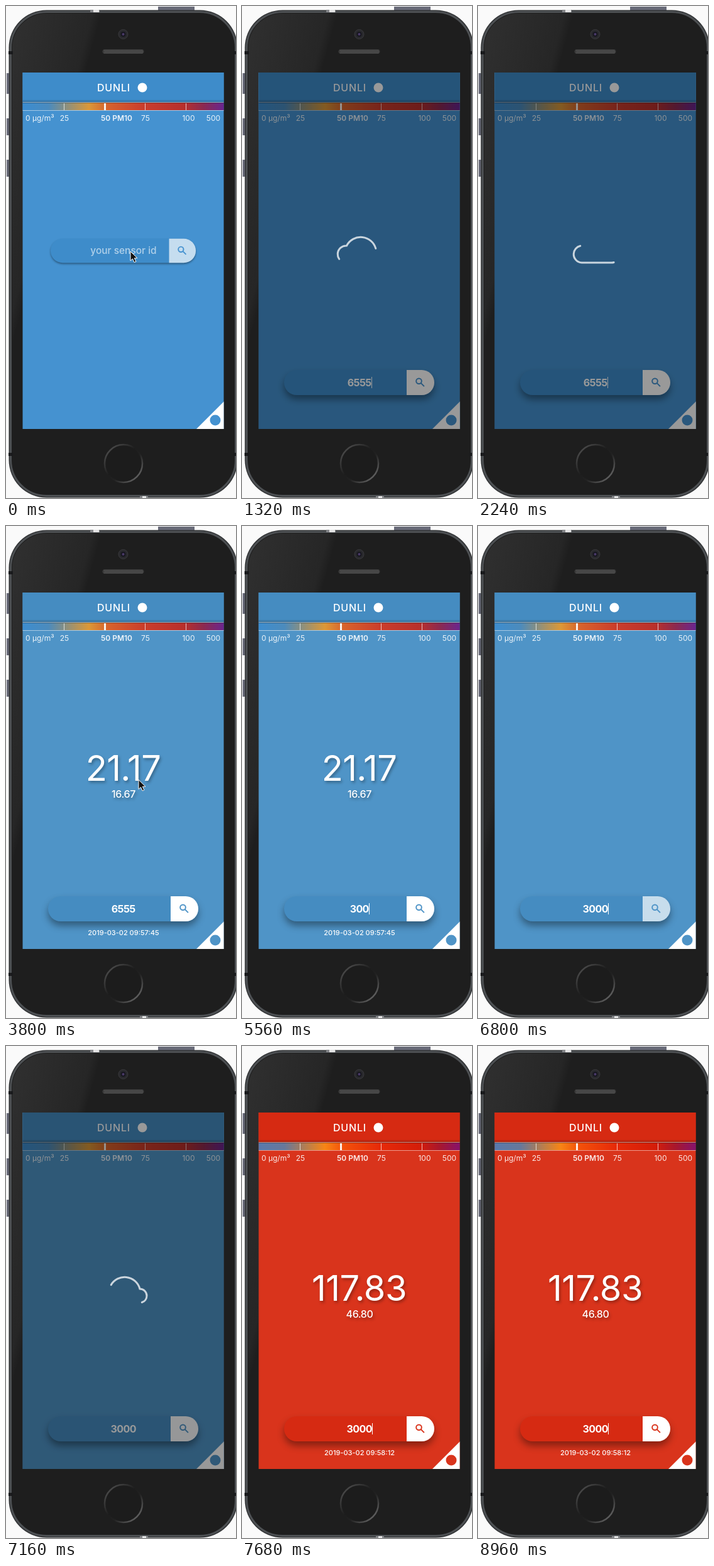
An HTML page for the animation above (9 s loop, 366 px wide and 784 px high).

```html
<!DOCTYPE html>
<html lang="en">
<head>
<meta charset="utf-8">
<title>Air sensor app</title>
<style>
  html, body { margin: 0; width: 100%; height: 100%; overflow: hidden; background: #fafafa; }
  svg { display: block; }
  text { font-family: Inter, Roboto, sans-serif; fill: #fff; }
  .mid { text-anchor: middle; }
  .labels text { font-size: 12px; fill-opacity: .9; }
  .shade { filter: drop-shadow(2px 3px 2px rgba(0, 0, 0, .3)); }
</style>
</head>
<body>
<svg width="366" height="784" viewBox="0 0 366 784">
  <defs>
    <linearGradient id="scale">
      <stop offset="0" stop-color="#388bd1"/>
      <stop offset=".13" stop-color="#4b89ba"/>
      <stop offset=".22" stop-color="#9f8f69"/>
      <stop offset=".33" stop-color="#ff9913"/>
      <stop offset=".42" stop-color="#fa5805"/>
      <stop offset=".6" stop-color="#ea2804"/>
      <stop offset=".8" stop-color="#d31704"/>
      <stop offset=".9" stop-color="#9b0f32"/>
      <stop offset="1" stop-color="#720a82"/>
    </linearGradient>
    <linearGradient id="face" x2=".6" y2=".35">
      <stop offset="0" stop-color="#303030"/>
      <stop offset=".45" stop-color="#262626"/>
      <stop offset=".5" stop-color="#1e1e1e"/>
    </linearGradient>
    <linearGradient id="ring" x2="1" y2="1">
      <stop offset=".1" stop-color="#4c4c4c"/>
      <stop offset=".45" stop-color="#1d1d1d"/>
      <stop offset=".6" stop-color="#222"/>
      <stop offset=".9" stop-color="#666"/>
    </linearGradient>
    <linearGradient id="drop" x2="0" y2="1">
      <stop offset="0" stop-opacity="0"/>
      <stop offset="1" stop-opacity=".3"/>
    </linearGradient>
    <clipPath id="view"><path d="M26.500 106h320v568h-320z"/></clipPath>
  </defs>

  <!-- phone -->
  <path d="M1 107h5v33H1zM1 179h5v27H1zM1 245h5v27H1zM242 1h58v6h-58z" fill="#686a78"/>
  <rect x="4.500" y="6.500" width="364" height="777" rx="60" fill="#303234"/>
  <rect x="7.500" y="9.500" width="358" height="771" rx="57" fill="#1e1e1e" stroke="#4d5053" stroke-width="3"/>
  <rect x="10" y="12" width="353" height="766" rx="54.500" fill="url(#face)"/>
  <path d="M134 6h15v4h-15zM213 781h13v3h-13z" fill="#85878a"/>
  <path d="M139 6h9v4h-9zM217 781h6v3h-6z" fill="#e4e4e4"/>
  <path d="M4 72h7v5H4zM362 72h4v5h-4zM4 712h7v5H4zM362 712h4v5h-4z" fill="#191a1c"/>
  <circle cx="186.500" cy="45" r="7.500" fill="#29292d" stroke="#3a3a3d"/>
  <circle cx="186.500" cy="45" r="4" fill="#17171f"/>
  <circle cx="186.500" cy="45" r="2" fill="#4a3a68"/>
  <rect x="153.500" y="69" width="66" height="7" rx="3.500" fill="#3b3b3b"/>
  <path d="M156 71h62M157 73h61M156 75h62" stroke="#6b6b6b" stroke-dasharray="1 1"/>
  <circle cx="187" cy="729" r="30" fill="#1c1c1c" stroke="url(#ring)" stroke-width="2.500"/>

  <!-- screen -->
  <g clip-path="url(#view)">
    <path id="bg" d="M26 106h321v568H26z"/>
    <path id="head" d="M26 106h321v47H26z"/>
    <path d="M26 149h321v5H26z" fill="url(#drop)"/>
    <path d="M26 154h321v12H26z" fill="url(#scale)" opacity=".8"/>
    <path d="M26 153.500h321M26 166.500h321" stroke="#fff" stroke-opacity=".5"/>
    <path d="M26 154.500h321" stroke="#000" stroke-opacity=".3"/>
    <path d="M92.500 155v11M221.500 155v11M286.500 155v11" stroke="#fff" stroke-opacity=".7"/>
    <path d="M157.500 155v11" stroke="#fff" stroke-opacity=".9" stroke-width="3"/>
    <text x="145" y="136" font-size="16" font-weight="500" letter-spacing=".8">DUNLI</text>
    <circle cx="217" cy="130" r="7.500" fill="#fff"/>
    <g class="labels">
      <text x="31" y="183">0 µg/m³</text>
      <text class="mid" x="93" y="183">25</text>
      <text class="mid" x="176" y="183" font-weight="600">50 PM10</text>
      <text class="mid" x="222" y="183">75</text>
      <text class="mid" x="290.500" y="183">100</text>
      <text class="mid" x="330" y="183">500</text>
    </g>

    <g id="result" class="mid">
      <g class="shade">
        <text id="big" x="186.500" y="406" font-size="56" font-weight="400" letter-spacing="-.6"></text>
        <text id="small" x="187" y="433" font-size="16" font-weight="500" letter-spacing="-.4"></text>
      </g>
      <text id="date" x="187" y="652" font-size="11" font-weight="500"></text>
    </g>

    <g id="search">
      <rect id="box" x="-119.500" y="-20" width="239" height="40" rx="20"/>
      <path id="button" d="M75.500-20h24a20 20 0 0 1 0 40h-24z" fill="#fff"/>
      <path id="lens" d="M99.300-2.300a4.300 4.300 0 1 1-8.600 0a4.300 4.300 0 1 1 8.600 0M98.200 .9l5.200 5.200" fill="none" stroke-width="2"/>
      <text id="hint" class="mid" x=".5" y="5.500" font-size="16" font-weight="500" fill-opacity=".6">your sensor id</text>
      <text id="typed" class="mid" x=".2" y="5.500" font-size="16" font-weight="700" letter-spacing="-.6"></text>
      <path id="caret" d="M0-9v18" stroke="#fff"/>
    </g>

    <path d="M347 630v44h-44z" fill="#fff"/>
    <circle id="badge" cx="333" cy="660" r="8.500"/>

    <path id="dim" d="M26 106h321v568H26z"/>
    <path id="cloud" d="M165 409A13.500 13.500 0 0 1 166.500 382A25 25 0 0 1 213 387A11 11 0 0 1 213 409Z"
      pathLength="100" fill="none" stroke="#fff" stroke-width="3" stroke-linecap="round" stroke-dasharray="48.500 51.500"/>
  </g>

  <path id="pointer" d="M0 0v15l3.500-3.200 2.600 5.700 2.800-1.200-2.600-5.500h4.700z" fill="#111" stroke="#fff"/>
</svg>
<script>
const LOOP = 9000;
const $ = id => document.getElementById(id);
const set = (id, attrs) => { for (const k in attrs) $(id).setAttribute(k, attrs[k]); };
const ramp = (t, from, to) => {
  const p = Math.min(1, Math.max(0, (t - from) / (to - from)));
  return p * p * (3 - 2 * p);
};
const mix = (a, b, p) => a.map((v, i) => v + (b[i] - v) * p);
const rgb = c => `rgb(${c.map(Math.round)})`;

// colours for idle, clean and polluted air
const AIR = [[69, 146, 208], [79, 148, 199], [217, 52, 28]];
const PANEL = [[62, 140, 202], [69, 140, 193], [214, 42, 18]];
const KEYS = [
  [0, ''], [480, '6'], [600, '65'], [720, '655'], [840, '6555'],
  [4480, '655'], [4600, '65'], [4700, '6'], [4800, ''],
  [5000, '3'], [5240, '30'], [5440, '300'], [5660, '3000']
];
const POINTER = [[0, 198, 391], [3680, 198, 391], [3800, 211, 404], [4280, 200, 606], [LOOP, 200, 606]];

function drawSearch(t, panel, air) {
  const focus = ramp(t, 200, 400);
  const y = 390 + 210 * ramp(t, 960, 1280) + 10 * ramp(t, 2700, 2900);
  set('search', { transform: `translate(186.500 ${y}) scale(${.967 + .033 * focus})` });
  set('box', { fill: panel });
  $('box').style.filter = `drop-shadow(0 ${2 + 5 * focus}px ${1.5 + 4.5 * focus}px rgba(0,0,0,.38))`;
  set('button', { opacity: .7 + .3 * (ramp(t, 840, 1000) - ramp(t, 6560, 6700) + ramp(t, 7000, 7200)) });
  set('lens', { stroke: air });

  const [since, word] = KEYS.findLast(k => k[0] <= t);
  $('typed').textContent = word;
  set('hint', { opacity: word ? 0 : 1 });
  const caretX = word ? Math.round($('typed').getComputedTextLength() / 2) + 1 : 0;
  const lit = t > 240 && (t - since) % 1000 < 500;
  set('caret', { transform: `translate(${caretX} 0)`, opacity: lit ? 1 : 0 });
}

function drawResult(t) {
  const clean = t < 7000;
  $('big').textContent = clean ? '21.17' : '117.83';
  $('small').textContent = clean ? '16.67' : '46.80';
  $('date').textContent = clean ? '2019-03-02 09:57:45' : '2019-03-02 09:58:12';
  set('result', { opacity: ramp(t, 2760, 3000) - ramp(t, 6520, 6700) + ramp(t, 7400, 7600) });
}

function drawLoader(t) {
  const load = ramp(t, 960, 1240) - ramp(t, 2680, 2920) + ramp(t, 6840, 7040) - ramp(t, 7360, 7560);
  set('dim', { opacity: .4 * load });
  set('cloud', { opacity: .75 * load, 'stroke-dashoffset': -6.5 - (t - 1320) / 14 });
}

function drawPointer(t) {
  const i = POINTER.findLastIndex(p => p[0] <= t);
  const [a, b] = [POINTER[i], POINTER[i + 1]];
  const [x, y] = mix(a.slice(1), b.slice(1), (t - a[0]) / (b[0] - a[0]));
  const shown = t < 440 || (t > 3680 && t < 4480);
  set('pointer', { transform: `translate(${x} ${y})`, opacity: shown ? 1 : 0 });
}

function draw(t) {
  const clean = ramp(t, 2680, 3000), dirty = ramp(t, 7320, 7600);
  const tone = c => rgb(mix(mix(c[0], c[1], clean), c[2], dirty));
  const air = tone(AIR), panel = tone(PANEL);
  set('bg', { fill: air });
  set('head', { fill: panel });
  set('badge', { fill: air });
  drawSearch(t, panel, air);
  drawResult(t);
  drawLoader(t);
  drawPointer(t);
}

function frame() {
  draw(performance.now() % LOOP);
  requestAnimationFrame(frame);
}
frame();
</script>
</body>
</html>
```
